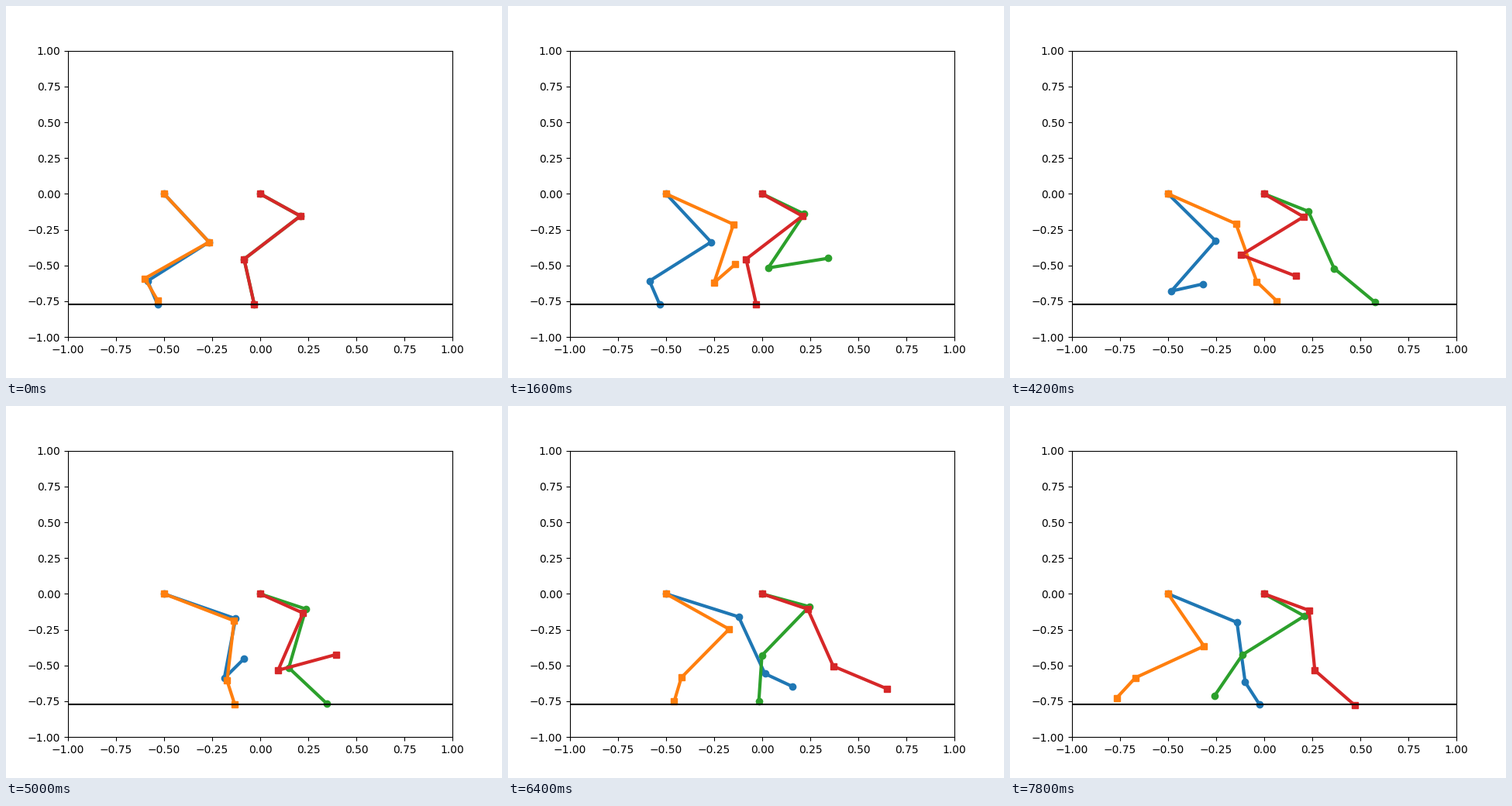
Write a matplotlib script that moves like this. It is 640 px wide and 480 px high and loops after 8 s.

```python
import numpy as np
import matplotlib.pyplot as plt
from matplotlib.animation import FuncAnimation

STEP = 200      # ms per frame
FRAMES = 40
LAG = 3200      # delay of the second leg of each pair, ms
GROUND = -0.77

HIND_LINKS = (0.41, 0.42, 0.17)
FORE_LINKS = (0.26, 0.42, 0.32)

# rest, fold, lift, reach, lower, touch, drag, push off
KEY_TIMES = np.array([200, 1000, 1800, 3200, 4200, 5000, 6400, 7800])

# thigh, shank and foot angles in degrees, measured forward from straight down
FORE_REST = (53.5, -44.2, 9.5)
FORE = [
    (52.0, -50.6, 62.6),
    (59.0, -18.0, 110.0),
    (65.8, 18.4, 60.6),
    (62.0, 18.6, 42.0),
    (66.0, -12.2, 38.4),
    (70.0, -35.8, -2.9),
    (53.5, -50.0, -26.9),
]
HIND_RESTS = [(34.8, -52.8, 23.6), (34.8, -49.7, 17.9)]
HIND = [
    (37.0, -33.2, 106.8),
    (65.0, -8.0, 143.0),
    (67.0, 19.0, 58.0),
    (59.4, 15.0, 37.8),
    (62.7, -5.0, 13.5),
    (53.1, -36.3, -12.6),
    (27.1, -58.3, -34.5),
]


class Leg:
    def __init__(self, ax, hip, links, rest, gait, delay, style):
        self.angles = np.array([rest] + gait)
        self.slopes = np.gradient(self.angles, KEY_TIMES, axis=0)
        self.hip, self.links, self.delay = hip, np.array(links), delay
        self.line, = ax.plot([], [], style[0] + "-", color=style[1:], lw=3)

    def pose(self, t):
        """Cubic Hermite interpolation between the key poses."""
        t = np.clip(t, KEY_TIMES[0], KEY_TIMES[-1] - 1e-6)
        i = np.searchsorted(KEY_TIMES, t, side="right") - 1
        h = KEY_TIMES[i + 1] - KEY_TIMES[i]
        u = (t - KEY_TIMES[i]) / h
        a, b = self.angles[i:i + 2]
        ma, mb = self.slopes[i:i + 2] * h
        return (a + (b - a) * u * u * (3 - 2 * u)
                + u * (1 - u) ** 2 * ma - u * u * (1 - u) * mb)

    def draw(self, t):
        ang = np.radians(self.pose(t - self.delay))
        x = self.hip + np.append(0, np.cumsum(self.links * np.sin(ang)))
        y = -np.append(0, np.cumsum(self.links * np.cos(ang)))
        self.line.set_data(x, y)
        return self.line


fig, ax = plt.subplots(figsize=(6.4, 4.8), dpi=100)
ax.set_xlim(-1, 1)
ax.set_ylim(-1, 1)

first, second = HIND_RESTS
legs = [
    Leg(ax, -0.5, HIND_LINKS, second, HIND, LAG, "oC0"),
    Leg(ax, -0.5, HIND_LINKS, first, HIND, 0, "sC1"),
    Leg(ax, 0.0, FORE_LINKS, FORE_REST, FORE, 0, "oC2"),
    Leg(ax, 0.0, FORE_LINKS, FORE_REST, FORE, LAG, "sC3"),
]
ax.axhline(GROUND, color="black")


def update(frame):
    return [leg.draw(frame * STEP) for leg in legs]


anim = FuncAnimation(fig, update, frames=FRAMES, interval=STEP,
                     repeat=True, repeat_delay=0, blit=False)
plt.show()
```
